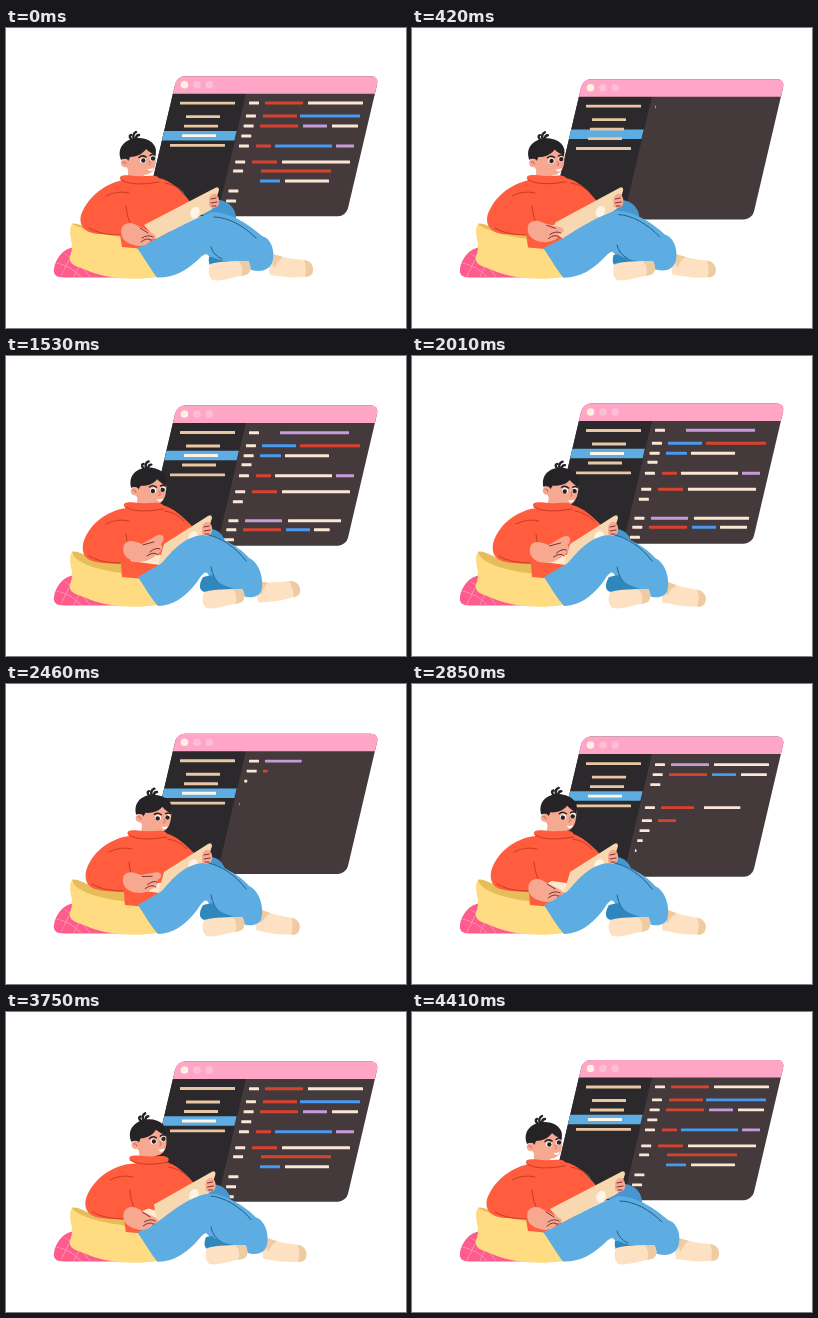
These frames come from a looping animation (400x300 px, 4.44 s). An HTML page:

```html
<!DOCTYPE html>
<html lang="en">
<head>
<meta charset="utf-8">
<title>Coding on a cushion</title>
<style>
html, body { margin: 0; width: 100%; height: 100%; overflow: hidden; background: #fff; }
svg { display: block; width: 100vw; height: 100vh; }
.ink { fill: none; stroke-width: 1; stroke-linecap: round; stroke-linejoin: round; }
</style>
</head>
<body>
<svg viewBox="0 0 400 300">
  <g id="win">
    <g transform="translate(0 48) skewX(-13.2)">
      <rect x="171" width="202" height="140.200" rx="8" fill="#443a3c"/>
      <path d="M171 17H244V140.200H179Q171 140.200 171 132.200Z" fill="#2b292b"/>
      <path d="M171 17.500V8Q171 0 179 0H365Q373 0 373 8V17.500Z" fill="#ffa5c6"/>
      <rect id="mark" x="171" width="72.500" height="9.500" fill="#5dade2"/>
    </g>
    <circle cx="178.500" cy="56.500" r="3.800" fill="#fff0e2"/>
    <circle cx="191" cy="56.500" r="3.800" fill="#ffbdd6"/>
    <circle cx="203.300" cy="56.500" r="3.800" fill="#ffbdd6"/>
    <g id="side"></g>
  </g>
  <g id="code"></g>

  <path d="M48 241C50 228 61 217 72 220L115 249.500H58C50 249.500 47 246 48 241Z" fill="#ff5c8d"/>
  <path class="ink" d="M51 235Q65 238 75 249M59 226Q74 235 84 249M70 221Q62 232 55 248M80 229Q72 238 68 249" stroke="#ff91b4"/>
  <path d="M66 196C70 194 80 200 92 205L136 207V224C98 222 80 215 68 205Z" fill="#e7bd59"/>
  <path id="pillow" fill="#ffdb82"/>

  <path id="knee" fill="#4696cf"/>
  <g id="torso">
    <path id="body" fill="#ff5d3e"/>
    <path class="ink" d="M83 200Q94 207 114 207M120 178Q121 190 126 199M159 155Q171 157 178 165M100 168Q112 162 123 165" stroke="#c83c25"/>
  </g>
  <g id="head">
    <path d="M117 126C117 139 124 147 136 147C148 147 152 139 149 121L136 116Z" fill="#f6a890"/>
    <path d="M122 140H138V152H122Z" fill="#f6a890"/>
    <path d="M115 132C110 119 120 110 133 110C146 110.500 152 119 149.500 127C146 125 143 124 140 121C137 126 130 129 124 129L122 134Q119 129 115 132Z" fill="#252326"/>
    <path class="ink" d="M126 112Q122 108 125 107M128 111Q126 106 130 104M130 111Q130 107 133 107" stroke="#252326" style="stroke-width:2.400"/>
    <circle cx="119" cy="135" r="4.200" fill="#f6a890"/>
    <path class="ink" d="M117 134Q119 133 120 136" stroke="#c8685c"/>
    <ellipse cx="137" cy="132.500" rx="3.100" ry="2.800" fill="#fff"/>
    <ellipse cx="146.700" cy="130.500" rx="2.600" ry="2.800" fill="#fff"/>
    <g id="pupils" fill="#252326"><circle cx="137.300" cy="132.500" r="2.200"/><circle cx="147" cy="130.500" r="2.200"/></g>
    <path class="ink" d="M133 129.500Q136 126.500 140 129M144 127.500Q147 125.500 149 127" stroke="#252326" style="stroke-width:1.500"/>
    <path class="ink" d="M143 133Q146 136 143 137" stroke="#d9705f"/>
    <path d="M141 140.500Q144 142 147.500 139.500Q147 143.500 143.500 143Z" fill="#fff"/>
  </g>
  <g id="collar">
    <path d="M114 151C113 146 121 147 130 148C143 149 149 146 153 150C157 158 122 161 114 151Z" fill="#ff5d3e"/>
    <path class="ink" d="M115 152Q126 159 153 154" stroke="#c83c25"/>
  </g>

  <path id="base" fill="#ffe9cf"/>
  <g id="footR">
    <path d="M267 226C275 229 285 231 298 232C306 233 309 240 306 246C304 249 290 250 280 249L264 247C262 240 264 232 267 226Z" fill="#fee1c3"/>
    <path d="M298 232C306 233 309 240 306 246C305 248 302 249 299 249Q301 240 298 232Z" fill="#efcba2"/>
    <path d="M267 226L277 229Q270 234 269 240Q264 234 267 226Z" fill="#efcba2"/>
  </g>
  <path id="lid" fill="#f8d8b1"/>
  <ellipse id="disc" rx="4.500" ry="6" fill="#fff4e6"/>
  <path id="legs" fill="#5dade2"/>
  <path id="seam" class="ink" stroke="#245d86"/>
  <path id="cuff" fill="#2f88bd"/>
  <g id="footL">
    <path d="M205 236C215 233 230 233 243 233C247 240 245 246 240 247C228 249 215 254 207 252C202 248 203 240 205 236Z" fill="#fee1c3"/>
    <path d="M233 233H243C247 240 245 246 240 247L236 248Q239 239 233 233Z" fill="#efcba2"/>
  </g>
  <g id="grip">
    <path d="M203 171Q205 165 210 166Q215 171 212 178Q207 182 203 178Z" fill="#f6a890"/>
    <path class="ink" d="M205 171L210 170M205 175L211 174M206 178L210 178" stroke="#7b3231"/>
  </g>
  <g id="arm">
    <path id="hand" fill="#f6a890"/>
    <path id="fingers" class="ink" stroke="#7b3231"/>
  </g>
</svg>
<script>
const LOOP = 4440, BOB = LOOP / 2;
const NS = "http://www.w3.org/2000/svg";
const el = id => document.getElementById(id);
const set = (id, name, value) => el(id).setAttribute(name, value);
const move = (id, x, y, extra = "") => set(id, "transform", `translate(${x} ${y}) ${extra}`);
const clamp = v => Math.max(0, Math.min(1, v));
const smooth = u => u * u * (3 - 2 * u);
const inOut = u => u < .5 ? 4 * u ** 3 : 1 - 4 * (1 - u) ** 3;

// Eased value from time/value pairs
function track(t, keys) {
  if (t <= keys[0]) return keys[1];
  for (let i = 2; i < keys.length; i += 2) {
    if (t <= keys[i]) {
      const u = (t - keys[i - 2]) / (keys[i] - keys[i - 2]);
      return keys[i - 1] + (keys[i + 1] - keys[i - 1]) * smooth(u);
    }
  }
  return keys[keys.length - 1];
}

// Blend two paths with the same commands
const number = /-?\d+(\.\d+)?/g;
function blend([near, far], k) {
  const ends = far.match(number);
  let i = 0;
  return near.replace(number, n => (+n + (ends[i++] - n) * k).toFixed(2));
}

// Each shape: legs drawn in, legs stretched
const shapes = {
  pillow: ["M66 196C68 206 90 214 116 217L136 221C143 232 151 242 152 249C125 253 98 250 80 242C72 238 62 238 64 228C70 216 60 206 66 196Z",
           "M66 196C72 199 90 206 116 209L136 220C143 232 151 242 152 249C125 253 98 250 80 242C72 238 62 238 64 228C70 216 60 206 66 196Z"],
  body: ["M121 152C102 154 82 168 77 188C75 202 84 206 97 207L115 208L116 221L150 224L186 170C176 160 168 152 156 149Z",
         "M117 152C102 155 83 166 75 187C72 200 82 206 95 206L114 207L116 219L150 222L186 176C175 162 165 152 152 150Z"],
  knee: ["M190 184C196 172 206 170 214 177C218 181 219 184 219 187L200 192Z",
         "M196 186C200 172 213 168 223 176C228 180 230 186 230 190L205 194Z"],
  base: ["M124 205L154 209L162 200L140 197Z",
         "M139 197L150 211L160 204L145 196Z"],
  lid: ["M158 188L202 160Q206 158 206 162L201 178Q200 182 196 184L152 209Z",
        "M138 197L209 160Q213 158 213 162L208 178Q207 181 203 183L150 211Z"],
  cuff: ["M197 221C192 229 193 236 200 236L234 235C222 231 211 228 206 219Z",
         "M203 229C202 236 204 240 210 240L243 236C228 234 214 233 206 229Z"],
  legs: ["M132 221L156 207C165 196 180 178 200 179C215 180 235 192 243 202C256 208 258 228 255 236C250 244 236 242 232 236C226 236 212 234 207 228C200 212 200 216 195 220C185 236 170 250 152 250C145 242 139 232 132 221Z",
         "M131 220L150 211C168 201 190 190 206 184C226 184 246 199 256 208C270 212 270 236 262 240C255 246 240 242 236 236C228 232 210 234 204 230C200 224 200 226 196 228C180 244 167 250 151 249.5C145 242 139 231 131 220Z"],
  seam: ["M202 179C214 181 230 191 240 205M205 211Q207 224 216 230",
         "M208 189C222 189 238 198 250 210M205 219Q207 227 216 231"]
};
const hands = {
  hand: ["M118 189C122 182 130 186 136 188L150 180C158 176 160 184 155 188C160 194 148 202 140 205C128 208 114 202 118 189Z",
         "M116 199C120 194 126 194 132 198L146 205C152 208 151 212 145 211C143 218 134 219 128 217C118 215 113 208 116 199Z"],
  fingers: ["M137 189L148 186M144 196Q150 191 154 193M141 200Q148 195 152 199",
            "M134 200L142 205M136 210Q142 206 147 209M135 214Q141 209 145 212"]
};

// Rows: y, lead bar (+ or -), then coloured spans
const pages = [
  `75+ r259-297 w302-357|88+ r257-291 b294-354|98+ r254-292 p297-321 w326-352|108+|118+ r250-265 b269-326 p330-348|134+ r246-271 w276-344|143+ r255-325|153- b254-274 w279-323|163+|173+|183+`,
  `75+ p274-343|88+ b256-290 r294-354|98+ b254-275 w279-323|107+|118+ r250-265 w269-326 p330-348|134+ r246-271 w276-344|144+|163+ p239-276 w282-337|172+ r237-275 b280-304 w308-335|182+`,
  `75+ p259-297 w302-357|85+ r257-295 b300-324 w329-355|95+|118+ r249-282 w292-344|131+ r246-264 b284-310|141+ w255-300|151+ p240-276|161+ r238-270 w282-333`
];
const inks = { w: "#fbe7d6", r: "#d8432f", b: "#4799f2", p: "#c79bda" };

function bar(parent, x, y, w, fill) {
  const r = document.createElementNS(NS, "rect");
  const attrs = { x, y: y - 1.4, width: w, height: 2.8, rx: .5, fill };
  for (const a in attrs) r.setAttribute(a, attrs[a]);
  parent.appendChild(r);
  return r;
}

const sheets = pages.map(text => {
  const g = document.createElementNS(NS, "g");
  el("code").appendChild(g);
  const rows = text.split("|").map(line => {
    const [head, ...spans] = line.split(" ");
    const y = parseInt(head), lead = 243 - .234 * (y - 75), bars = [];
    const add = (a, b, ink) => bars.push({ a, b, node: bar(g, a, y, b - a, inks[ink]) });
    if (head.endsWith("+")) add(lead, lead + 10, "w");
    spans.forEach(s => add(...s.slice(1).split("-").map(Number), s[0]));
    return bars;
  });
  return { g, rows };
});

function type(sheet, t, step, span) {
  sheet.rows.forEach((bars, i) => {
    const from = bars[0].a, len = Math.max(60, bars[bars.length - 1].b - from);
    const edge = from + len * inOut(clamp((t - i * step) / span));
    for (const { a, b, node } of bars)
      node.setAttribute("width", Math.max(0, Math.min(b, edge) - a));
  });
}

const menu = [[75, 174, 55], [88.5, 180, 34], [98, 178, 34], [107.5, 176, 34], [117.3, 164, 55]]
  .map(([y, x, w]) => ({ y, node: bar(el("side"), x, y, w, "#e9c7a4") }));

function drawCode(t) {
  const second = 345, third = 2130, first = 3200;
  const page = t < second || t >= first ? 0 : t < third ? 1 : 2;
  sheets.forEach((s, i) => s.g.setAttribute("display", i === page ? "inline" : "none"));
  if (page === 0) type(sheets[0], t < second ? LOOP : t - first, 24, 290);
  else type(sheets[page], t - (page === 1 ? second : third), 88, 680);

  const y = track(t, [second, 107.5, second + 160, 98, third, 98, third + 160, 107.5]);
  set("mark", "y", y - 52.7);
  for (const m of menu)
    m.node.setAttribute("fill", Math.abs(m.y - y) < 4 ? "#fff4e8" : "#e9c7a4");
}

function draw(t) {
  const bob = 1.75 + 2.85 * Math.cos((t - 870) / BOB * 2 * Math.PI);
  move("win", 0, bob + .6);
  move("code", 0, bob * 1.25 + .6);
  drawCode(t);

  const k = track(t, [250, 1, 780, 0, 3300, 0, 4200, 1]);
  const h = track(t, [250, 1, 780, 0, 2300, 0, 2700, 1]);
  for (const id in shapes) set(id, "d", blend(shapes[id], k));
  for (const id in hands) set(id, "d", blend(hands[id], h));

  const sway = track(t, [1550, 0, 2000, 4, 2850, 2, 3650, 4, 4300, 0]);
  move("torso", sway, 0);
  move("collar", track(t, [250, 0, 800, 4, 1550, 4, 2000, 7, 2850, 8, 3650, 10, 4300, 0]),
    track(t, [250, 0, 800, -1, 2850, -1, 3650, -4, 4300, 0]));

  const hx = track(t, [250, 0, 800, 9, 1550, 9, 2000, 14, 2850, 13, 3650, 12, 4300, 0]);
  const hy = track(t, [250, 0, 800, 1.2, 2000, 1.5, 2850, 0, 3650, -3, 4300, 0]);
  const tilt = track(t, [250, 0, 800, 5, 1550, 5, 2000, 9, 2850, 5, 3650, -3, 4300, 0]);
  move("head", hx, hy, `rotate(${tilt} 132 146)`);
  const down = track(t, [250, 0, 800, 1, 2850, 1, 3500, 0]);
  move("pupils", -.5 * down, .6 * down);

  const tap = Math.sin(t / LOOP * 2 * Math.PI * 16);
  move("arm", sway * h * .6 + (1 - h) * .5 * tap, (1 - h) * tap);
  move("grip", -7 * (1 - k), 0);
  set("disc", "transform", `translate(${187 + 2 * k} ${181 + 3.5 * k}) rotate(25)`);

  move("footL", -.7 - 6 * (1 - k), 0);
  const lift = track(t, [1300, 0, 1490, -16, 1570, -16, 1800, 0]);
  move("footR", -13 * (1 - k), -.5 * (1 - k), `rotate(${4 * (1 - k) + lift} 266 238)`);
}

const start = performance.now();
function frame(now) {
  draw(Math.max(0, now - start) % LOOP);
  requestAnimationFrame(frame);
}
draw(0);
requestAnimationFrame(frame);
</script>
</body>
</html>
```
